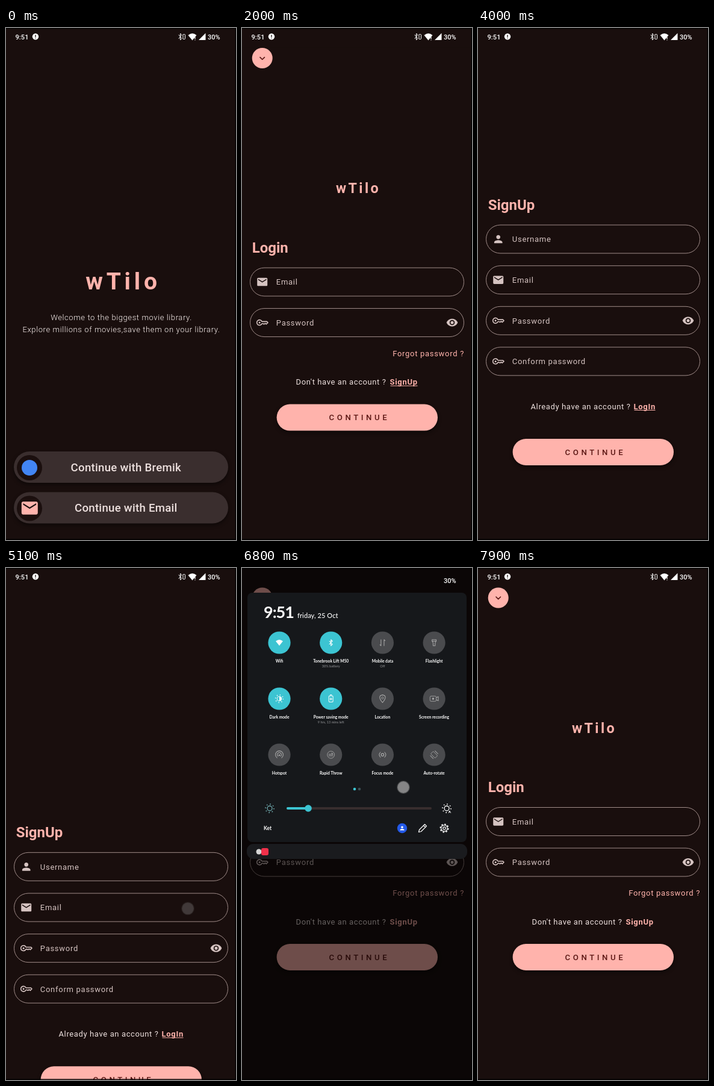
An HTML page that plays this animation: 382 px wide and 850 px high, repeating every 8 s.

```html
<!DOCTYPE html>
<html lang="en">
<head>
<meta charset="utf-8">
<title>Movie app sign-in</title>
<style>
  html, body { margin: 0; width: 100%; height: 100%; overflow: hidden; background: #190e0d; }
  svg { display: block; width: 382px; height: 850px; font-family: Roboto, sans-serif; }
  .raised { filter: drop-shadow(0 3px 3px #0007); }
  .panel { font-family: Lato, sans-serif; }
</style>
</head>
<body>
<svg id="stage" viewBox="0 0 382 850"></svg>
<script>
const LOOP = 8000, PAGE = 818, TOP = 32;
const BG = '#190e0d', PINK = '#ffb3ac', PALE = '#ede0de', SOFT = '#d5c3c1', MAROON = '#5c1714', CYAN = '#3cc4d2';

const icons = {
  mail: 'M20 4H4c-1.1 0-2 .9-2 2v12c0 1.1.9 2 2 2h16c1.1 0 2-.9 2-2V6c0-1.1-.9-2-2-2zm0 4-8 5-8-5V6l8 5 8-5v2z',
  user: 'M12 12c2.2 0 4-1.8 4-4s-1.8-4-4-4-4 1.8-4 4 1.8 4 4 4zm0 2c-2.7 0-8 1.3-8 4v2h16v-2c0-2.7-5.3-4-8-4z',
  eye: 'M12 4.5C7 4.5 2.7 7.6 1 12c1.7 4.4 6 7.5 11 7.5s9.3-3.1 11-7.5c-1.7-4.4-6-7.5-11-7.5zM12 17a5 5 0 1 1 0-10 5 5 0 0 1 0 10zm0-8a3 3 0 1 0 0 6 3 3 0 0 0 0-6z'
};

const text = (x, y, size, str, { fill = PALE, w = 400, ls = 0, anchor = 'start' } = {}) =>
  `<text x="${x}" y="${y}" font-size="${size}" font-weight="${w}" fill="${fill}" letter-spacing="${ls}" text-anchor="${anchor}">${str}</text>`;
const rect = (x, y, w, h, r, fill, more = '') =>
  `<rect x="${x}" y="${y}" width="${w}" height="${h}" rx="${r}" fill="${fill}" ${more}/>`;
const circle = (x, y, r, fill, more = '') => `<circle cx="${x}" cy="${y}" r="${r}" fill="${fill}" ${more}/>`;
const ring = (x, y, r, color, width = 1, dash = 'none') =>
  circle(x, y, r, 'none', `stroke="${color}" stroke-width="${width}" stroke-dasharray="${dash}"`);
const line = (d, color = '#fff', width = 1.2) =>
  `<path d="${d}" fill="none" stroke="${color}" stroke-width="${width}" stroke-linecap="round" stroke-linejoin="round"/>`;
const at = (x, y, body, scale = 1) => `<g transform="translate(${x} ${y}) scale(${scale})">${body}</g>`;
const icon = (name, x, y, scale = .85, fill = SOFT) =>
  at(x, y, `<path transform="translate(-12 -12)" d="${icons[name]}" fill="${fill}"/>`, scale);
const key = (x, y) => at(x, y, circle(-4.6, 0, 1.5, SOFT) +
  line('M-.6-1.7H7.6L9.3 0 6.6 2.6 4.8 1.2 3 2.6 1.2 1.7H-.6A4.4 4.4 0 1 1-.6-1.7z', SOFT, 1.6));

const choice = (y, label, mark) =>
  rect(13, y, 356, 52, 26, '#3a2e2e', 'class="raised"') + circle(39, y + 27, 21, '#1b0f0e') + mark +
  text(199.3, y + 32.7, 18.6, label, { w: 500, ls: .28, anchor: 'middle' });

const field = (y, label, name) =>
  rect(13.5, y - 23.5, 355, 47, 23.5, 'none', 'stroke="#a08c89"') +
  (name === 'key' ? key(33.7, y) : icon(name, 33.7, y)) +
  text(56.8, y + 4.8, 13, label, { fill: SOFT, ls: .72 }) +
  (label === 'Password' ? icon('eye', 349, y) : '');

const proceed = y =>
  rect(57.6, y, 267.4, 44, 22, PINK, 'class="raised"') +
  text(194.9, y + 26.8, 13.2, 'CONTINUE', { fill: MAROON, w: 500, ls: 4.6, anchor: 'middle' });

const link = (x, y, label, width, id) =>
  text(x, y, 13, label, { fill: PINK, w: 700, ls: .7 }) +
  `<path id="${id}" d="M${x + 1} ${y + 2}h${width}" stroke="${PINK}"/>`;

const intro = { fill: '#fff5f3', w: 300, ls: .6, anchor: 'middle' };
const welcome =
  text(194.5, 434, 39, 'wTilo', { fill: PINK, w: 700, ls: 5.8, anchor: 'middle' }) +
  text(191.5, 485, 13, 'Welcome to the biggest movie library.', intro) +
  text(191.5, 505, 13, 'Explore millions of movies,save them on your library.', intro) +
  choice(703, 'Continue with Bremik', circle(39, 730, 13, '#4285f4')) +
  choice(770.5, 'Continue with Email', icon('mail', 39.3, 797, 1.35, PINK));

const login =
  text(193, 273.5, 23.3, 'wTilo', { fill: PINK, w: 700, ls: 3.4, anchor: 'middle' }) +
  text(16.7, 372, 24, 'Login', { fill: PINK, w: 700 }) +
  field(421, 'Email', 'mail') + field(488.5, 'Password', 'key') +
  text(369, 544, 13, 'Forgot password ?', { fill: PINK, ls: .7, anchor: 'end' }) +
  text(89.5, 591.5, 13, "Don't have an account ?", { ls: .6 }) +
  link(245.5, 591.5, 'SignUp', 45, 'underline') + proceed(624);

const signup =
  text(16.7, 301.5, 24, 'SignUp', { fill: PINK, w: 700 }) +
  field(350.5, 'Username', 'user') + field(418.2, 'Email', 'mail') +
  field(485.8, 'Password', 'key') + field(553.4, 'Conform password', 'key') +
  text(87.5, 632.5, 13, 'Already have an account ?', { ls: .62 }) +
  link(258.5, 632.5, 'LogIn', 35, 'loginLine') + proceed(682);

const status =
  text(15.5, 19, 11, '9:51', { fill: '#fff', w: 500, ls: .1 }) +
  circle(49, 14.3, 5.2, '#fff') + line('M49 12v2.5M49 16.6v.1', BG, 1.4) +
  line('M287 11.5l5 6-2.5 2.5v-11l2.5 2.5-5 6', '#fff', 1) +
  rect(294, 10.5, 3.5, 8, 1, 'none', 'stroke="#fff"') +
  '<path d="M302.5 12q7-6 14 0l-7 8.5z" fill="#fff"/>' + line('M314 15v3M314 20v.1') +
  '<path d="M320 20h11.5V8.5z" fill="#fff"/>';

// Quick-settings tiles: label, small line, lit, glyph centred on 0,0
const GREY = '#aaa';
const tiles = [
  ['Wifi', '', 1, '<path d="M-7-3q7-6 14 0L0 6z" fill="#fff"/>'],
  ['Tonebrook Lift M50', '30% battery', 1, line('M-3-3l6 6-3 3v-12l3 3-6 6')],
  ['Mobile data', 'Off', 0, line('M-3-6V6l-2-2M3 6V-6l2 2', GREY)],
  ['Flashlight', '', 0, line('M-4-6h8v3l-2 3v6h-4v-6l-2-3zM-4-3h8', GREY)],
  ['Dark mode', '', 1, ring(0, 0, 4.5, '#fff') + '<path d="M0-4.5a4.5 4.5 0 0 1 0 9z" fill="#fff"/>' +
    ring(0, 0, 7.5, '#fff', 1.8, '1.5 4.39')],
  ['Power saving mode', '9 hrs, 13 mins left', 1,
    rect(-4, -5.5, 8, 12, 1.5, 'none', 'stroke="#fff" stroke-width="1.2"') + line('M-1.5-7.5h3M0-2v5M-2 .5h4')],
  ['Location', '', 0, line('M0 7.5q-11-13 0-15 11 2 0 15z', GREY) + ring(0, -1.5, 2, GREY)],
  ['Screen recording', '', 0, rect(-8, -5, 12, 10, 2, 'none', `stroke="${GREY}"`) +
    line('M4-2l4-2v8l-4-2', GREY) + circle(-2, 0, 2, GREY)],
  ['Hotspot', '', 0, line('M-4.5 6a7.5 7.5 0 1 1 9 0M-2.5 3a4 4 0 1 1 5 0', GREY) + circle(0, 1, 1.6, GREY)],
  ['Rapid Throw', '', 0, ring(0, 0, 7, GREY) + line('M-4-1h8l-2.5-2.5M4 2h-8', GREY)],
  ['Focus mode', '', 0, ring(0, 0, 2.6, GREY, 1.4) + line('M-4-5q-5 5 0 10M4-5q5 5 0 10', GREY)],
  ['Auto-rotate', '', 0, '<g transform="rotate(-45)">' + rect(-3.5, -6, 7, 12, 1.5, 'none', `stroke="${GREY}"`) +
    line('M-6.5-4v8M6.5-4v8', GREY) + '</g>']
];
const tile = ([label, note, lit, glyph], i) => {
  const x = 62 + i % 4 * 85.7, y = 124 + Math.floor(i / 4) * 93;
  const centred = { anchor: 'middle', fill: '#fff', w: 700 };
  return circle(x, y, 18.6, lit ? CYAN : '#4a4b4e') + at(x, y, glyph, .85) +
    text(x, y + 33, 6.7, label, centred) + text(x, y + 40.5, 5.6, note, { ...centred, fill: '#96979a', w: 400 });
};
const sun = (x, color) => at(x, 399, ring(0, 0, 4, color, 1.3) + ring(0, 0, 7, color, 1.8, '1.5 4'));

const shade =
  rect(9, 41, 364, 414, 8, '#16181b') + rect(8, 458, 366, 25, 11, '#1a1b1e') +
  text(36, 83, 27, '9:51', { fill: '#fff', w: 700, ls: -1 }) +
  text(92, 83, 11, 'friday, 25 Oct', { fill: '#fff', w: 500, ls: .1 }) +
  tiles.map(tile).join('') +
  circle(187, 367, 2.3, CYAN) + circle(195, 367, 2.3, '#3d5054') +
  sun(46, '#6fa9ad') + sun(340, '#fff') + text(343, 407, 6, 'A', { fill: '#fff', w: 700 }) +
  rect(74, 397, 241, 4, 2, '#382d2e') + rect(74, 397, 36, 4, 2, CYAN) + circle(110, 399, 5.8, CYAN) +
  text(36, 435, 8.5, 'Ket', { fill: '#fff', w: 700 }) +
  circle(266, 432, 8.2, '#2359e8') + icon('user', 266, 432, .45, '#fff') +
  line('M293.5 438.5l1-4 9-9 3 3-9 9zM301.5 427.5l3 3') +
  ring(336, 432, 2.2, '#fff', 1.2) + ring(336, 432, 5.2, '#fff', 1.2) + ring(336, 432, 6.6, '#fff', 1.8, '2.6 2.58') +
  circle(28, 471, 4.5, '#d5d5d5') + rect(32, 465, 12, 12, 3, '#f0304a');

const stage = document.getElementById('stage');
stage.innerHTML =
  `<clipPath id="view"><path d="M0 ${TOP}h382v${PAGE}H0z"/></clipPath>` +
  rect(0, 0, 382, 850, 0, BG) + welcome +
  `<g clip-path="url(#view)"><g id="sheet">${rect(0, TOP, 382, PAGE, 0, BG)}
    <g id="login">${login}</g><g id="signup">${signup}</g>
    <g id="back">${circle(33.7, 49.5, 17, PINK) + line('M30 48l3.7 3.7 3.7-3.7', MAROON, 1.7)}</g></g></g>` +
  `<g id="status">${status}</g>` +
  '<path d="M0 .5h382M381.5 0v850M0 849h382" stroke="#000" stroke-width="1.4"/>' +
  `<rect id="dim" width="382" height="850"/>` +
  `<g id="shade" class="panel">${shade}</g>` +
  `<g id="percent">${text(335, 19, 11, '30%', { fill: '#fff', w: 500 })}</g>` +
  circle(0, 0, 10, GREY, 'id="touch" stroke="#777" stroke-opacity=".4" stroke-width="2"');

const el = Object.fromEntries([...stage.querySelectorAll('[id]')].map(e => [e.id, e]));
const move = (e, y, x = 0) => e.setAttribute('transform', `translate(${x} ${y})`);
const fade = (e, a) => e.setAttribute('opacity', a);
const span = (t, a, b) => Math.min(1, Math.max(0, (t - a) / (b - a)));
const easeOut = u => 1 - (1 - u) ** 3;
const easeInOut = u => u * u * (3 - 2 * u);

function draw(t) {
  move(el.sheet, PAGE * (1 - easeOut(span(t, 1600, 2040))));

  // Vertical pages: animated forward, then dragged back and released
  const drag = 169 * span(t, 4800, 5150);
  const pull = drag + (PAGE - 169) * easeOut(span(t, 5150, 5600));
  const scroll = PAGE * easeInOut(span(t, 2600, 3050)) - pull;
  move(el.login, -scroll);
  move(el.signup, PAGE - scroll);
  fade(el.back, 1 - span(t, 2850, 3420) + span(t, 5350, 5650));
  fade(el.underline, 1 - span(t, 5600, 5780));

  const open = easeOut(span(t, 6480, 6800)) - easeInOut(span(t, 7380, 7780));
  move(el.shade, -200 * (1 - open));
  fade(el.shade, open);
  fade(el.dim, .57 * open);
  fade(el.status, 1 - open);
  move(el.percent, 6 * open);

  const dragging = t >= 4800 && t < 5160, pulling = t >= 6500 && t < 6880;
  fade(el.touch, dragging ? .28 : pulling ? .75 : 0);
  if (dragging) move(el.touch, 420 + drag, 302);
  else move(el.touch, 364 * span(t, 6480, 6800), 268);
}

(function tick() {
  draw(performance.now() % LOOP);
  requestAnimationFrame(tick);
})();
</script>
</body>
</html>
```
